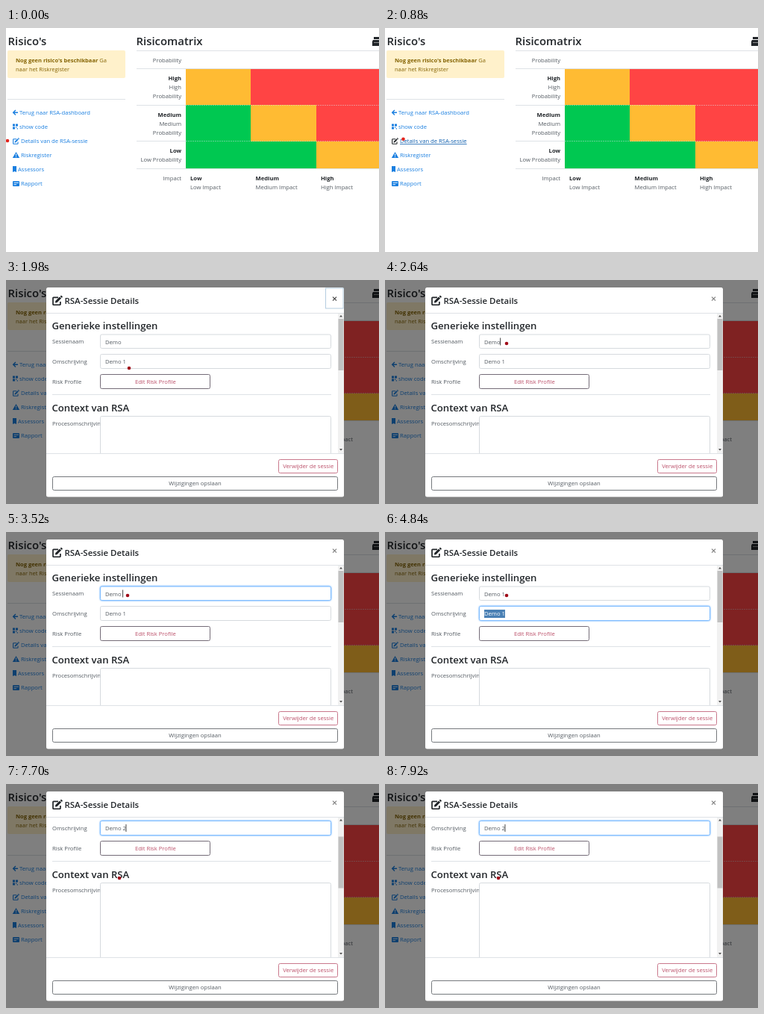
These frames come from a looping animation (500 by 300 pixels, 8 s). An HTML page:

```html
<!DOCTYPE html>
<html lang="nl">
<head>
<meta charset="utf-8">
<title>Risicomatrix</title>
<style>
  html, body { margin: 0; width: 100%; height: 100%; overflow: hidden; background: #fff; }
  svg { display: block; width: 100vw; height: 100vh; color: #212529; }
  text { font: 7.65px "Open Sans", "Noto Sans", sans-serif; fill: #545b62; white-space: pre; }
  .h { font-weight: 600; fill: #212529; }
  .h1 { font-size: 14.9px; }
  .h2 { font-size: 13.15px; }
  .h3 { font-size: 11.45px; }
  .b { font-weight: 700; fill: #212529; }
  .end { text-anchor: end; }
  .mid { text-anchor: middle; }
  .alert, .alert tspan { fill: #856404; font-size: 7.5px; }
  .link { color: #1a7fe0; }
  .link text { fill: currentColor; }
  .link .hover { color: #212529; }
  .link .hover text { fill: #0b5cad; text-decoration: underline; }
  .solid { fill: currentColor; }
  .line { fill: none; stroke: currentColor; }
  .rule { stroke: #dee2e6; fill: none; }
  .box { fill: #fff; stroke: #d6dade; }
  .focus { stroke: #80bdff; filter: drop-shadow(0 0 1.2px #4da3ff); }
  .red { fill: #bb4f69; }
</style>
</head>
<body>
<svg viewBox="0 0 500 300">
  <defs>
    <symbol id="edit" viewBox="0 0 14 14">
      <path class="line" stroke-width="1.7" d="M8 2.8H1.8Q1 2.8 1 3.6V12Q1 12.9 1.8 12.9H10Q10.9 12.9 10.9 12V8.6"/>
      <path class="solid" d="M4.3 7.6 10 1.9 12.1 4 6.4 9.7 3.9 10.1ZM10.6 1.3 11.6.4Q12.1 0 12.6.4L13.6 1.4Q14 1.9 13.6 2.4L12.7 3.4Z"/>
    </symbol>
    <clipPath id="body"><path d="M54 45H453V232H54Z"/></clipPath>
  </defs>

  <rect width="500" height="300" fill="#fff"/>
  <text class="h h1" x="2.5" y="22.5">Risico's</text>
  <rect x="2" y="30" width="158" height="37" rx="2" fill="#fff1cb"/>
  <text class="alert" x="13" y="46"><tspan class="b">Nog geen risico's beschikbaar</tspan> Ga</text>
  <text class="alert" x="13" y="58">naar het Riskregister</text>
  <path class="rule" d="M2 95.5H160"/>

  <g class="link">
    <path class="line" stroke-width="1.4" d="M16 113.2H10M12.9 110 9.7 113.2 12.9 116.4"/>
    <text x="18" y="116">Terug naar RSA-dashboard</text>
    <path class="solid" d="M9 128.5h3v3h-3zm4 0h3v3h-3zm-4 4h3v3h-3zm4 0h1.3v1.3h-1.3zm1.7 1.7h1.3v1.3h-1.3z"/>
    <text x="18" y="135">show code</text>
    <g id="details">
      <use href="#edit" x="9" y="147" width="9" height="9"/>
      <text x="20" y="154">Details van de RSA-sessie</text>
    </g>
    <path class="solid" d="M13.5 166 18.2 174H8.8Z"/>
    <path d="M13.5 168.5V171M13.5 171.9V173" stroke="#fff"/>
    <text x="20" y="173">Riskregister</text>
    <path class="solid" d="M9 185h5v8l-2.5-1L9 193Z"/>
    <text x="16" y="192">Assessors</text>
    <rect class="solid" x="9" y="205" width="9" height="7" rx="1"/>
    <path d="M10.5 207.2H17M10.5 209.7H14" stroke="#fff" stroke-width=".9"/>
    <text x="20" y="211">Rapport</text>
  </g>

  <text class="h h1" x="174.5" y="22.5">Risicomatrix</text>
  <path d="M493 12h7v3h-7zM492 16h8v8h-9v-6z" fill="#212529"/>
  <path d="M493 19.5H500" stroke="#aaa" stroke-width=".8"/>
  <path fill="#ffbb33" d="M241 55h87v48h-87zM328 103h88v49h-88zM416 152h84v36h-84z"/>
  <path fill="#ff4444" d="M328 55H500V152H416V103H328Z"/>
  <path fill="#00c851" d="M241 103H328V152H416V188H241Z"/>
  <path class="rule" d="M175 30.5H500M175 54.5H500M175 103.5H241M175 151.5H241M175 188.5H500"/>
  <path class="rule" stroke-opacity=".45" stroke-dasharray="2 1" d="M241 103.5H500M241 151.5H500"/>
  <g class="end">
    <text x="235" y="46">Probability</text>
    <text x="235" y="70" class="b">High</text>
    <text x="235" y="82">High</text>
    <text x="235" y="94">Probability</text>
    <text x="235" y="118.5" class="b">Medium</text>
    <text x="235" y="130.5">Medium</text>
    <text x="235" y="142.5">Probability</text>
    <text x="235" y="167" class="b">Low</text>
    <text x="235" y="179">Low Probability</text>
    <text x="235" y="203.5">Impact</text>
  </g>
  <text x="247" y="203.5" class="b">Low</text>
  <text x="247" y="215.5">Low Impact</text>
  <text x="334.5" y="203.5" class="b">Medium</text>
  <text x="334.5" y="215.5">Medium Impact</text>
  <text x="422" y="203.5" class="b">High</text>
  <text x="422" y="215.5">High Impact</text>

  <g id="modal">
    <rect width="500" height="300" fill="#000" fill-opacity=".5"/>
    <rect x="54" y="10" width="399" height="280.5" rx="2.5" fill="#fff"/>
    <use href="#edit" x="62" y="20.5" width="14" height="14"/>
    <text class="h h3" x="78.5" y="31.5">RSA-Sessie Details</text>
    <rect id="closeFocus" x="428.5" y="11" width="23.5" height="27" fill="#fff" stroke="#b4cde0"/>
    <path id="cross" d="M438 22.6 443 27.6M443 22.6 438 27.6" stroke-width="1.2"/>

    <g clip-path="url(#body)">
      <g id="content">
        <text class="h h2" x="61.5" y="66">Generieke instellingen</text>
        <text x="62" y="85">Sessienaam</text>
        <rect id="nameBox" class="box" x="126.5" y="73" width="309" height="18.5" rx="2"/>
        <text id="name" x="133" y="85.5"></text>
        <text x="62" y="112">Omschrijving</text>
        <rect id="aboutBox" class="box" x="126.5" y="99.5" width="309" height="19" rx="2"/>
        <rect id="selection" x="133" y="104" height="11" fill="#4a80b4"/>
        <text id="about" x="133" y="112.3"></text>
        <path id="caret" stroke="#333" stroke-width=".9"/>
        <text x="62" y="139">Risk Profile</text>
        <rect x="126.5" y="126.5" width="147" height="19" rx="2" fill="#fff" stroke="#746c78"/>
        <text class="red mid" x="200.3" y="139">Edit Risk Profile</text>
        <path class="rule" d="M62 153.5H436"/>
        <text class="h h2" x="61.5" y="175.5">Context van RSA</text>
        <text x="62" y="194.7">Procesomschrijving</text>
        <rect class="box" x="126.5" y="182.5" width="309" height="120" rx="2"/>
      </g>
    </g>

    <path d="M445 45H453V232H445Z" fill="#f1f1f1"/>
    <rect id="thumb" x="445.5" width="7" height="69" fill="#c1c1c1"/>
    <path d="M447 49.5 449 47 451 49.5ZM447 226 449 228.5 451 226Z" fill="#505050"/>
    <path class="rule" d="M54 44.5H453M54 232.5H453"/>
    <rect x="365.5" y="240.5" width="79" height="18" rx="2" fill="#fff" stroke="#c9788c"/>
    <text class="red mid" x="405.2" y="252.4">Verwijder de sessie</text>
    <rect x="62.5" y="263.5" width="382" height="18" rx="2" fill="#fff" stroke="#75797d"/>
    <text class="mid" x="253.5" y="275.4">Wijzigingen opslaan</text>
  </g>
  <circle id="pointer" r="2.3"/>
</svg>
<script>
  const LOOP = 8000;
  const $ = id => document.getElementById(id);
  const show = (id, on) => $(id).setAttribute('visibility', on ? 'inherit' : 'hidden');
  const set = (id, attrs) => { for (const k in attrs) $(id).setAttribute(k, attrs[k]); };

  // Each track holds [start time, value] pairs; a value stays until the next start.
  const pointerTrack = [
    [0, [2, 151]], [440, [10, 150]], [660, [19, 150]], [880, [24.5, 148.7]],
    [1540, [80, 125]], [1760, [131, 102]], [1980, [165, 118]], [2200, [191, 135]],
    [2420, [162, 87]], [2640, [163, 85]], [7700, [152, 126]]
  ];
  const nameTrack = [[0, 'Demo'], [3520, 'Demo '], [4180, 'Demo 1']];
  const aboutTrack = [[0, 'Demo 1'], [6160, 'Demo '], [6380, 'Demo 2']];
  const caretTrack = [[0, ''], [2640, 'name'], [4840, ''], [5500, 'about'], [7260, ''], [7700, 'about']];
  const valueAt = (track, t) => track.filter(([start]) => start <= t).pop()[1];

  function draw(t) {
    const [x, y] = valueAt(pointerTrack, t);
    set('pointer', { cx: x, cy: y, fill: t < 1980 ? '#e3261f' : '#a00d1a' });
    set('details', { class: t >= 660 && t < 1320 ? 'hover' : '' });
    show('modal', t >= 1320);
    const closeFocused = t < 2640;
    show('closeFocus', closeFocused && t >= 1320);
    set('cross', { stroke: closeFocused ? '#444' : '#808080' });

    $('name').textContent = valueAt(nameTrack, t);
    $('about').textContent = valueAt(aboutTrack, t);
    set('nameBox', { class: t >= 2860 && t < 4840 ? 'box focus' : 'box' });
    set('aboutBox', { class: t >= 4840 ? 'box focus' : 'box' });

    const selected = t >= 4840 && t < 5500;
    show('selection', selected);
    set('selection', { width: $('about').getComputedTextLength() });
    $('about').style.fill = selected ? '#fff' : '';

    const field = valueAt(caretTrack, t);
    show('caret', field && t >= 1320);
    if (field) {
      const caretX = 133 + $(field).getComputedTextLength();
      set('caret', { d: `M${caretX} ${field === 'name' ? 77.5 : 104}v10` });
    }

    const scroll = t >= 7700 ? 50 : 0;
    set('content', { transform: `translate(0 ${-scroll})` });
    set('thumb', { y: 52 + scroll * 0.37 });
  }

  function tick() {
    draw(performance.now() % LOOP);
    requestAnimationFrame(tick);
  }
  tick();
</script>
</body>
</html>
```
